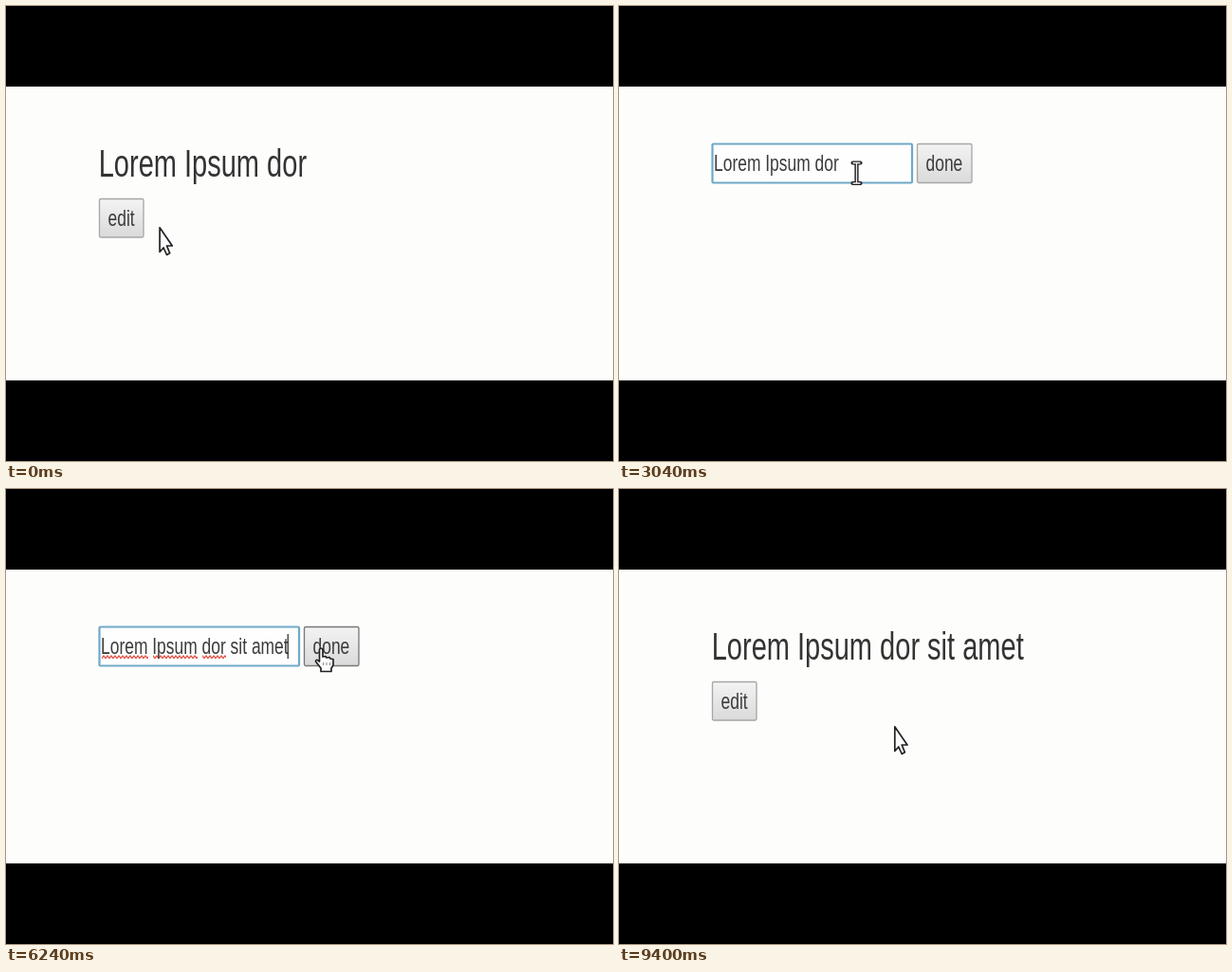
Animation of 640 by 480 pixels, one loop 9440 ms. Source, as an HTML page:

```html
<!DOCTYPE html>
<html lang="en">
<head>
<meta charset="utf-8">
<title>Inline edit</title>
<style>
  html, body { margin: 0; width: 100%; height: 100%; overflow: hidden; background: #000; }
  svg { display: block; width: 640px; height: 480px; }
  text { font: 16px "Liberation Sans", Arial, sans-serif; fill: #3c3c3c; white-space: pre; }
  #title { font-size: 26.7px; fill: #333; }
  .btn rect { fill: url(#face); stroke: #a6a6a6; stroke-width: 1.3; }
  .btn.hover rect { stroke: #787878; }
  .btn.down rect { fill: url(#pressed); }
  #box { fill: #fefefe; stroke: #b0b0b0; stroke-width: 1.2; }
  #box.focus { stroke: #70a9c8; stroke-width: 2.2; }
  #caret { fill: #222; }
  .pointer { stroke: #222; stroke-linejoin: round; stroke-linecap: round; }
</style>
</head>
<body>
<svg viewBox="0 0 640 480">
  <defs>
    <linearGradient id="face" x2="0" y2="1">
      <stop stop-color="#f3f3f3"/><stop offset="1" stop-color="#dadada"/>
    </linearGradient>
    <linearGradient id="pressed" x2="0" y2="1">
      <stop stop-color="#d4d4d4"/><stop offset="1" stop-color="#ebebeb"/>
    </linearGradient>
    <pattern id="wave" x="101" y="175" width="4" height="5" patternUnits="userSpaceOnUse">
      <path d="M-1 4.4L0 3.6L2 1L4 3.6L5 4.9" fill="none" stroke="#e2483c" stroke-width="1.2"/>
    </pattern>
  </defs>

  <rect width="640" height="480"/>
  <rect y="85" width="640" height="310" fill="#fdfdfc"/>

  <g id="view">
    <text id="title" transform="translate(97.7 179.6) scale(1.087 1.5)"></text>
    <g id="edit" class="btn">
      <rect x="98.5" y="203.5" width="46.5" height="40.5" rx="1.5"/>
      <text transform="translate(107.5 232) scale(1.09 1.5)">edit</text>
    </g>
  </g>

  <g id="form">
    <rect id="box" x="98.5" y="145.5" width="210.5" height="41" rx="1"/>
    <g id="spell" fill="url(#wave)">
      <rect x="101" y="175" width="49" height="5"/>
      <rect x="155" y="175" width="47" height="5"/>
      <rect x="207" y="175" width="25" height="5"/>
    </g>
    <text id="value" transform="translate(100 174) scale(1.09 1.5)"></text>
    <rect id="caret" y="153" width="1.2" height="26"/>
    <g id="done" class="btn">
      <rect x="314.5" y="145.5" width="57.5" height="41" rx="1.5"/>
      <text transform="translate(323.5 174) scale(1.09 1.5)">done</text>
    </g>
  </g>

  <g id="mouse">
    <path id="arrow" class="pointer" d="M.8 .8V26.5L4.8 22L8.2 29.5L11.4 27.8L8.2 20H14Z"
          fill="#fdfdfd" stroke-width="1.7"/>
    <g id="beam" fill="none">
      <path class="pointer" d="M-3.5 -10.5H4.5M-3.5 11H4.5M.5 -10V10.5" stroke-width="4.2"/>
      <path d="M-3.5 -10.5H4.5M-3.5 11H4.5M.5 -10V10.5" stroke="#f2f2f2" stroke-width="1.3"/>
    </g>
    <g id="hand">
      <path class="pointer" d="M-1.5 1.5Q0 -1.5 2 1.5V9L5 8.5L6 10L9 9.5L10 11L13 11.5V18L11 21V24.5H0V21L-5.5 14Q-5.5 10.5 -1.5 14Z"
            fill="#fdfdfd" stroke-width="1.7"/>
      <path d="M2.5 15V18M6 15V18M9.5 15V18" stroke="#8c8c8c" stroke-width="1"/>
    </g>
  </g>
</svg>
<script>
const LOOP = 9440, STEP = 40;
const OPEN = 1080, FOCUS = 2440, CLOSE = 6480;
const before = "Lorem Ipsum dor", added = " sit amet";
const keyTimes = [3120, 3720, 3840, 4000, 4240, 4440, 4600, 4840, 5040];
const path = [
  [0, 161.3, 233], [40, 161.3, 233], [440, 140, 232], [880, 113, 229],
  [1400, 113, 229], [1600, 200, 213], [1800, 231, 193], [2120, 250, 176],
  [5360, 250, 176], [5600, 270, 177], [5920, 311, 170], [6240, 332, 168],
  [6720, 332, 168], [7120, 331, 186], [7320, 314, 216], [7640, 299, 239],
  [8240, 290, 250], [LOOP, 290, 250]
];

const $ = id => document.getElementById(id);
const show = (id, on) => $(id).setAttribute("display", on ? "inline" : "none");
const within = (t, a, b) => t >= a && t < b;

function mouseAt(t) {
  const i = path.findIndex(p => p[0] > t);
  const [t0, x0, y0] = path[i - 1], [t1, x1, y1] = path[i];
  const k = (t - t0) / (t1 - t0);
  return [x0 + (x1 - x0) * k, y0 + (y1 - y0) * k];
}

function caretOn(t) {
  const lastKey = keyTimes.filter(k => k <= t).pop() ?? FOCUS + 80;
  return t >= FOCUS && Math.floor(Math.max(0, t - lastKey) / 520) % 2 === 0;
}

function render(t) {
  const editing = within(t, OPEN, CLOSE);
  const typed = keyTimes.filter(k => k <= t).length;
  const [x, y] = mouseAt(t);
  const over = (x0, y0, x1, y1) => within(x, x0, x1) && within(y, y0, y1);

  show("view", !editing);
  show("form", editing);
  $("title").textContent = before + (t >= CLOSE ? added : "");
  $("value").textContent = before + added.slice(0, typed);
  $("box").classList.toggle("focus", t >= FOCUS);
  show("spell", t >= 3200);
  show("caret", caretOn(t));
  if (editing) $("caret").setAttribute("x", 99 + $("value").getComputedTextLength() * 1.09);

  const onEdit = !editing && over(98, 203, 146, 245);
  const onDone = editing && over(314, 145, 373, 187);
  const onBox = editing && over(98, 145, 310, 187);
  $("edit").classList.toggle("hover", onEdit);
  $("done").classList.toggle("hover", onDone);
  $("edit").classList.toggle("down", within(t, 1000, OPEN));
  $("done").classList.toggle("down", within(t, 6400, CLOSE));

  show("hand", onEdit || onDone);
  show("beam", onBox);
  show("arrow", !(onEdit || onDone || onBox));
  $("mouse").setAttribute("transform", `translate(${x} ${y})`);
}

const start = performance.now();
function tick() {
  const t = (performance.now() - start) % LOOP;
  render(Math.floor((t + 1) / STEP) * STEP % LOOP);
  requestAnimationFrame(tick);
}
tick();
</script>
</body>
</html>
```
